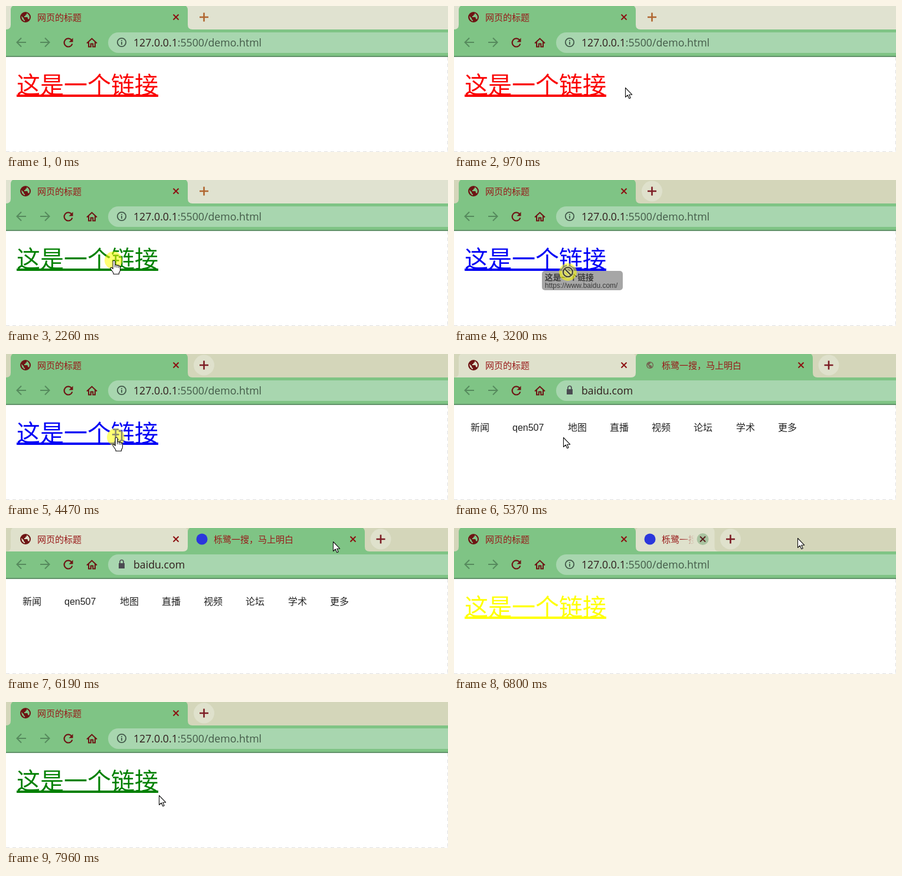
An HTML page with a canvas that plays this animation: 749 px wide and 249 px high, repeating every 8000 ms.

```html
<!DOCTYPE html>
<html lang="zh">
<head>
<meta charset="utf-8">
<title>链接的四种状态</title>
<style>
html, body { margin: 0; width: 100%; height: 100%; overflow: hidden; background: #fff; }
canvas { display: block; }
</style>
</head>
<body>
<canvas id="stage" width="749" height="249"></canvas>
<script>
const ctx = document.getElementById('stage').getContext('2d');
const W = 749, H = 249, LOOP = 8000;
const GREEN = '#7fc485', PILL = '#a8d6af', MAROON = '#6e1414', TITLE = '#981818';
const CJK = '"Noto Sans CJK SC", "Noto Sans CJK", sans-serif';
const ARIAL = '"Liberation Sans", "Noto Sans CJK SC", sans-serif';
const ADDRESS = '17.7px "Open Sans", "Noto Sans", sans-serif';
const NAV = [['新闻', 28], ['qen507', 99], ['地图', 193], ['直播', 264],
  ['视频', 335], ['论坛', 406], ['学术', 478], ['更多', 549]];

// Pointer moves: start, last step, step count, way points.
const MOVES = [
  [350, 1110, 12, [[560, 246], [470, 186], [372, 147], [290, 139], [228, 137]]],
  [1180, 1250, 2, [[228, 137], [183, 137]]],
  [2990, 3200, 4, [[183, 137], [189, 146], [193, 157]]],
  [3790, 3940, 3, [[193, 157], [187, 142]]],
  [4670, 4670, 1, [[187, 142], [185, 142]]],
  [5510, 6260, 12, [[185, 142], [215, 125], [400, 62], [540, 26], [582, 17]]],
  [6870, 7340, 8, [[582, 17], [583, 42], [540, 85], [400, 130], [303, 141]]],
  [7490, 7690, 4, [[303, 141], [226, 138]]],
  [7890, 7960, 2, [[226, 138], [259, 159]]]
];

const clamp = v => Math.max(0, Math.min(1, v));
const between = (t, a, b) => t >= a && t < b;
const easeOut = p => 1 - (1 - p) ** 2;

function along(pts, p) {
  const s = p * (pts.length - 1);
  const i = Math.min(Math.floor(s), pts.length - 2);
  const f = s - i;
  return [0, 1].map(k => pts[i][k] + (pts[i + 1][k] - pts[i][k]) * f);
}

function pointer(t) {
  let pos = null;
  for (const [start, end, n, pts] of MOVES) {
    if (t < start) break;
    const gap = n > 1 ? (end - start) / (n - 1) : 1;
    const step = Math.min(n, Math.floor((t - start) / gap + 0.001) + 1);
    pos = along(pts, step / n);
  }
  return pos;
}

function text(str, x, y, font, color) {
  ctx.font = font;
  ctx.fillStyle = color;
  ctx.fillText(str, x, y);
}

function rect(x, y, w, h, color) {
  ctx.fillStyle = color;
  ctx.fillRect(x, y, w, h);
}

function disc(x, y, r, color) {
  ctx.fillStyle = color;
  ctx.beginPath();
  ctx.arc(x, y, r, 0, 7);
  ctx.fill();
}

function stroke(d, color, width, x = 0, y = 0) {
  ctx.save();
  ctx.translate(x, y);
  ctx.strokeStyle = color;
  ctx.lineWidth = width;
  ctx.stroke(new Path2D(d));
  ctx.restore();
}

function shape(d, x, y, fill, line, width = 1) {
  ctx.save();
  ctx.translate(x, y);
  const p = new Path2D(d);
  ctx.fillStyle = fill;
  ctx.fill(p);
  if (line) {
    ctx.strokeStyle = line;
    ctx.lineWidth = width;
    ctx.lineJoin = 'round';
    ctx.stroke(p);
  }
  ctx.restore();
}

function globe(x, y, r, color, land) {
  disc(x, y, r, color);
  ctx.save();
  ctx.translate(x, y);
  ctx.scale(r / 9, r / 9);
  shape('M-7 -2L-3 2V4L-1 5V7Q-6 6 -7 -2Z', 0, 0, land);
  shape('M2 -7V-5Q2 -4 0 -4V-2H-2V0H3Q4 0 4 3Q6 3 6 4Q9 -3 2 -7Z', 0, 0, land);
  ctx.restore();
}

function tabShape(x0, x1, color) {
  shape(`M${x0 - 8} 40Q${x0} 40 ${x0} 32V7Q${x0} -1 ${x0 + 8} -1H${x1 - 8}` +
    `Q${x1} -1 ${x1} 7V32Q${x1} 40 ${x1 + 8} 40Z`, 0, 0, color);
}

function closeMark(x, hot) {
  if (hot) disc(x, 19, 10, '#a9c3a0');
  stroke('M-4.5 -4.5L4.5 4.5M4.5 -4.5L-4.5 4.5', hot ? '#5a2020' : '#8c1212', 2, x, 19);
}

function fadedTitle(str, x, limit) {
  if (limit <= x) return;
  const g = ctx.createLinearGradient(limit - 24, 0, limit, 0);
  g.addColorStop(0, TITLE);
  g.addColorStop(1, 'rgba(152,24,24,0)');
  text(str, x, 25, '15px ' + CJK, g);
}

function tabWidth(t) {
  if (t < 4670 || t >= 6940) return 0;
  if (t < 6590) return 300 * easeOut(clamp((t - 4600) / 300));
  const p = clamp((t - 6640) / 300);
  return 300 * (1 - p * p * (3 - 2 * p));
}

function tabs(t, second, pos) {
  const focused = t >= 2330;
  const idle = '#dfe1cc';
  rect(0, 0, W, 40, focused ? '#d4d6ba' : '#e0e2d0');
  const width = tabWidth(t), end = 308 + width;
  const drawSecond = () => width > 16 && tabShape(308, end, second ? GREEN : idle);
  if (!second) drawSecond();
  tabShape(8, 308, second ? idle : GREEN);
  if (second) drawSecond();

  globe(33, 19, 9, MAROON, second ? idle : GREEN);
  text('网页的标题', 53, 25, '15px ' + CJK, TITLE);
  closeMark(288, false);

  if (width > 36) {
    if (t < 5440) globe(332, 19, 6, '#746552', GREEN);
    else disc(332, 19, 9.5, '#2b37dc');
    if (t >= 5160) fadedTitle('栎鹭一搜，马上明白', 352, end - 34);
    if (width > 50) closeMark(end - 20, t >= 6590 || (second && pos[0] > 575 && pos[1] < 30));
  }

  const plus = width ? end + 27 : 335.5;
  if (focused) disc(plus, 19, 17.5, idle);
  stroke('M-7.5 0H7.5M0 -7.5V7.5', focused ? '#7c1c24' : '#b0652f', 2.6, plus, 19);
}

function toolbar(second) {
  rect(0, 40, W, 46, GREEN);
  rect(0, 85, W, 2, '#62926a');
  const arrow = 'M8 0H-7M0 -7.5L-7.5 0L0 7.5';
  stroke(arrow, '#568a5d', 2, 26, 62);
  ctx.save();
  ctx.translate(66, 62);
  ctx.scale(-1, 1);
  stroke(arrow, '#568a5d', 2);
  ctx.restore();

  stroke('M5.4 -4.6A7 7 0 1 0 6.8 2', MAROON, 2.2, 105.5, 62.5);
  shape('M8 -8V-1H1Z', 105.5, 62.5, MAROON);
  stroke('M-8.5 1L0 -7L8.5 1M-5.5 -1V7H-1.8V2H1.8V7H5.5V-1', MAROON, 2, 145.5, 62.5);

  ctx.fillStyle = PILL;
  ctx.beginPath();
  ctx.roundRect(173, 45, 620, 35, 17.5);
  ctx.fill();
  if (second) {
    rect(191, 60, 10, 9, '#4b4b52');
    stroke('M-3 0V-2.5A3 3 0 0 1 3 -2.5V0', '#4b4b52', 1.7, 196, 60);
    text('baidu.com', 216, 69, ADDRESS, '#301c1c');
  } else {
    stroke('M-7.2 0A7.2 7.2 0 1 1 7.2 0A7.2 7.2 0 1 1 -7.2 0M0 -1V4M0 -4V-2.2', '#42594a', 1.8, 196, 62);
    text('127.0.0.1', 216, 69, ADDRESS, '#301c1c');
    const x = 216 + ctx.measureText('127.0.0.1').width;
    text(':5500/demo.html', x, 69, ADDRESS, '#435a48');
  }
}

function page(t, second, color) {
  rect(0, 87, W, H - 87, '#fff');
  if (!second) {
    text('这是一个链接', 18, 149, '300 40px ' + CJK, color);
    rect(18, 151, 240, 4, color);
  } else if (t >= 5160) {
    for (const [name, x] of NAV) text(name, x, 131, '16px ' + ARIAL, '#222');
  }
  ctx.setLineDash([6, 5]);
  stroke('M0 248.5H749M748.5 87V249', '#dedede', 1);
  ctx.setLineDash([]);
}

function dragLabel(x, y) {
  ctx.fillStyle = 'rgba(160,160,160,.93)';
  ctx.beginPath();
  ctx.roundRect(x, y, 137, 33, 5);
  ctx.fill();
  text('这是一个链接', x + 5, y + 16, 'bold 13.8px ' + CJK, '#3a3a3a');
  text('https://www.baidu.com/', x + 5, y + 29, '12px ' + ARIAL, '#3a3a3a');
}

const ARROW = 'M.5 .5V16.5L4.2 13L6.8 18.8L9.2 17.7L6.7 12.2H11.7Z';
const HAND = 'M-1.8 1.5Q0 -1 1.8 1.5V8Q3.5 6.8 5 8.6Q7 7.4 8 9.4Q10.5 9 10.5 11.5V17' +
  'Q10 20 8.5 21V23.5H-1V21.5L-5.8 14.5Q-6.5 11.8 -4 12.2L-1.8 14.5Z';

function cursor(t, x, y, hand, dragging) {
  if (dragging) {
    stroke('M-8 0A8 8 0 1 1 8 0A8 8 0 1 1 -8 0M-5.6 -5.6L5.6 5.6', '#f4f4b0', 4.4, x, y);
    stroke('M-8 0A8 8 0 1 1 8 0A8 8 0 1 1 -8 0M-5.6 -5.6L5.6 5.6', '#4c4c38', 2.6, x, y);
  } else if (hand) {
    shape(HAND, x, y, '#fff', '#111', 1.1);
    stroke('M1.8 8V12M5 8.6V12.5M8 9.4V13', '#111', 1, x, y);
  } else {
    shape(ARROW, x, y, '#fff', '#111', 1.1);
  }
}

function draw(t) {
  const pos = pointer(t);
  const second = between(t, 4670, 6590);
  const dragging = between(t, 2990, 3460);
  const pressed = between(t, 2260, 3460) || between(t, 4470, 4670);
  const active = between(t, 2330, 3460) || between(t, 4470, 4670);
  const hover = !!pos && !second && pos[0] >= 18 && pos[0] < 258 && pos[1] > 110 && pos[1] < 159;
  const color = active ? '#0000f5' : hover || t >= 7890 ? '#008000'
    : t < 4670 ? '#fa0000' : '#ffff00';

  page(t, second, color);
  tabs(t, second, pos);
  toolbar(second);
  if (!pos) return;
  const [x, y] = pos;
  if (dragging) dragLabel(Math.round(x) - 44, Math.round(y) - 2);
  if (pressed) disc(x - (dragging ? 0 : 1), y, 15, 'rgba(255,255,0,.55)');
  cursor(t, Math.round(x), Math.round(y), hover, dragging);
}

const begin = performance.now();
function tick() {
  draw((performance.now() - begin) % LOOP);
  requestAnimationFrame(tick);
}
tick();
</script>
</body>
</html>
```
